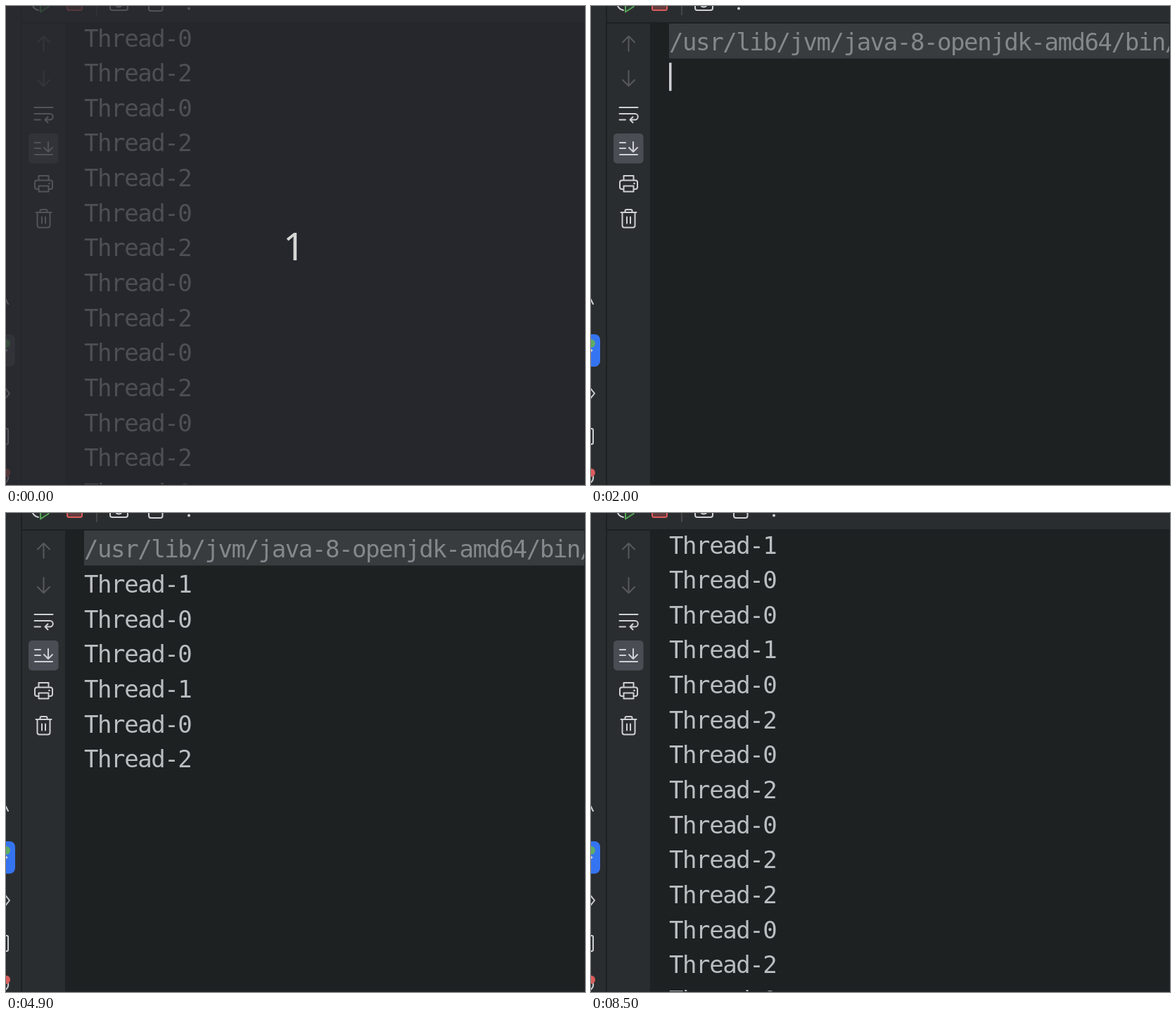
An HTML page for the animation above (8.9 s loop, 823 by 680 pixels).

```html
<!DOCTYPE html>
<html lang="en">
<head>
<meta charset="utf-8">
<title>Thread console</title>
<style>
  html, body { margin: 0; width: 100%; height: 100%; overflow: hidden; background: #1d2122; }
  svg { display: block; width: 823px; height: 680px; }
  .mono { font: 34px "DejaVu Sans Mono", "Noto Sans Mono", monospace; letter-spacing: -1.42px; fill: #bbbec0; white-space: pre; }
  .line { fill: none; stroke: #ced0d6; stroke-width: 2; stroke-linecap: round; stroke-linejoin: round; }
  .off { stroke: #56595d; }
  #count { font: 500 54px "Noto Sans", "Open Sans", sans-serif; fill: #d6d6d4; }
</style>
</head>
<body>
<svg viewBox="0 0 823 680">
  <defs><clipPath id="view"><rect x="84" y="25" width="739" height="655"/></clipPath></defs>
  <rect width="823" height="680" fill="#1d2122"/>
  <rect width="21" height="680" fill="#2a2d2f"/>
  <rect x="23" width="800" height="23" fill="#2a2d2f"/>
  <rect x="23" y="25" width="61" height="655" fill="#2a2d2f"/>

  <g clip-path="url(#view)">
    <g id="header">
      <rect x="111" y="25" width="712" height="49.5" fill="#393c3f"/>
      <text class="mono" x="111" y="63" style="fill:#84888c">/usr/lib/jvm/java-8-openjdk-amd64/bin/java</text>
    </g>
    <g id="rows"></g>
    <rect id="caret" x="111" width="3.5" height="40" fill="#ced0d6"/>
  </g>

  <!-- console side bar -->
  <rect x="32" y="181" width="42.5" height="42.5" rx="5" fill="#4a4e54"/>
  <g class="line">
    <path class="off" d="M53.5 43V64M45 51.5L53.5 43L62 51.5M53.5 92V113.5M45 105L53.5 113.5L62 105"/>
    <path d="M40.5 144H66.5M40.5 153H62.5a4 4 0 0 1 0 8.500H56M59.5 157.5L55.5 161.500L59.5 165.5M40.5 161.500H49"/>
    <path d="M41 194H49M41 202H49M41 211H66M60 193V207M54 201L60 207L66 201"/>
    <path d="M46.5 247.500V241H60.500V247.500M46 260H44a3 3 0 0 1-3-3V250.500a3 3 0 0 1 3-3H63a3 3 0 0 1 3 3V257a3 3 0 0 1-3 3H61M46.500 255.500H60.500V263.500H46.500Z"/>
    <path d="M42.500 293H64.500M48.500 293V291a2 2 0 0 1 2-2H56.500a2 2 0 0 1 2 2V293M44.500 293V311.500a3 3 0 0 0 3 3H59.500a3 3 0 0 0 3-3V293M51 299.500V308.500M56 299.500V308.500"/>
  </g>
  <circle cx="61.500" cy="252" r="1.300" fill="#ced0d6"/>

  <!-- window edge strip -->
  <path id="hammer" class="line" d="M-2 414L0 417L3 423"/>
  <circle id="buildDot" cx="0" cy="418" r="6" fill="#5fad65"/>
  <rect id="tool" x="-33" y="466" width="46" height="46" rx="8"/>
  <path class="line" d="M-3 486L1.500 489L-3 492"/>
  <circle id="runDot" cx="0" cy="479" r="6" fill="#5fad65"/>
  <path class="line" d="M-3 540L5 550L-3 560M-4 600H1a2 2 0 0 1 2 2V620a2 2 0 0 1-2 2H-4M3 668a9 9 0 0 1-4 9"/>
  <circle cx="0" cy="662.500" r="6" fill="#db5c5c"/>

  <!-- toolbar -->
  <path id="restart" class="line" d="M37.500-1A12 12 0 0 0 46 6"/>
  <path id="play" class="line" d="M49-8V8.500L60.500 1V-2"/>
  <rect id="stop" class="line" x="87" y="-14" width="21" height="20" rx="2.500"/>
  <rect x="128" width="2" height="13" fill="#43464a"/>
  <g id="camera" class="line"><rect x="148" y="-14" width="25" height="20" rx="3"/><path d="M155.500-2a5 5 0 0 0 9.500 0"/></g>
  <rect id="box" class="line" x="203" y="-13" width="19.500" height="20" rx="3"/>
  <circle id="more" cy="3.500" r="2" fill="#ced0d6"/>

  <path d="M822.500 24V680M84 679.500H823" stroke="#25282a" fill="none"/>
  <g id="intro">
    <rect width="823" height="680" fill="#282a31" opacity=".75"/>
    <text id="count" x="394" y="361">1</text>
  </g>
</svg>
<script>
const LOOP = 8900, PITCH = 49.66;
const $ = id => document.getElementById(id);
const output = "10010202022020";

// [time, changes]: every entry builds on the one before it
const steps = [
  [0,    { intro: true, rows: "02022020202020", top: 45.5, header: false, caret: -1,
           focus: false, live: true, build: false, short: false }],
  [100,  { intro: false }],
  [300,  { focus: true }],
  [500,  { focus: false }],
  [900,  { rows: "02202020202020" }],
  [1400, { focus: true }],
  [1600, { live: false }],
  [1700, { top: 30.5, build: true }],
  [1900, { rows: "", build: false }],
  [2000, { live: true, short: true, header: true, top: 101, caret: 0 }],
  [2100, { rows: output.slice(0, 2), caret: 2 }],
  [2300, { short: false }],
  [2900, { caret: -1 }],
  [3100, { rows: output.slice(0, 4), caret: 4 }],
  [4000, { caret: -1 }],
  [4100, { rows: output.slice(0, 6), caret: 6 }],
  [4900, { caret: -1 }],
  [5000, { rows: output.slice(0, 8), caret: 8 }],
  [6000, { caret: -1 }],
  [6100, { rows: output.slice(0, 10), caret: 10 }],
  [7000, { caret: -1 }],
  [7100, { rows: output.slice(0, 12), caret: 12 }],
  [7800, { caret: -1 }],
  [8000, { rows: output, top: 45.5, header: false }]
];

let state = {};
const timeline = steps.map(([at, change]) => ({ at, state: state = { ...state, ...change } }));

const show = (id, on) => $(id).style.display = on ? "" : "none";
const paint = (id, stroke, fill = "none") => Object.assign($(id).style, { stroke, fill });

function draw(s) {
  const icon = s.live ? "#ced0d6" : "#5a5d62";
  $("rows").innerHTML = [...s.rows].map((n, i) =>
    `<text class="mono" x="111" y="${s.top + i * PITCH + 12}">Thread-${n}</text>`).join("");
  show("header", s.header);
  show("caret", s.caret >= 0);
  $("caret").setAttribute("y", s.top + s.caret * PITCH - 20.5);
  show("intro", s.intro);
  show("buildDot", s.build);
  show("hammer", !s.build);
  show("runDot", s.live);
  show("box", !s.short);
  $("tool").style.fill = s.focus ? "#3574f0" : "#4a4e54";
  $("more").setAttribute("cx", s.short ? 210 : 260);
  paint("restart", icon);
  paint("play", s.live ? "#57a559" : icon, s.live ? "#2b3a2f" : icon);
  paint("stop", s.live ? "#db5c5c" : icon, s.live ? "#633b3c" : icon);
  paint("camera", icon);
  paint("box", icon);
}

let shown;
function frame() {
  const t = performance.now() % LOOP;
  const step = timeline.findLast(e => e.at <= t);
  if (step !== shown) draw((shown = step).state);
  requestAnimationFrame(frame);
}
frame();
</script>
</body>
</html>
```
